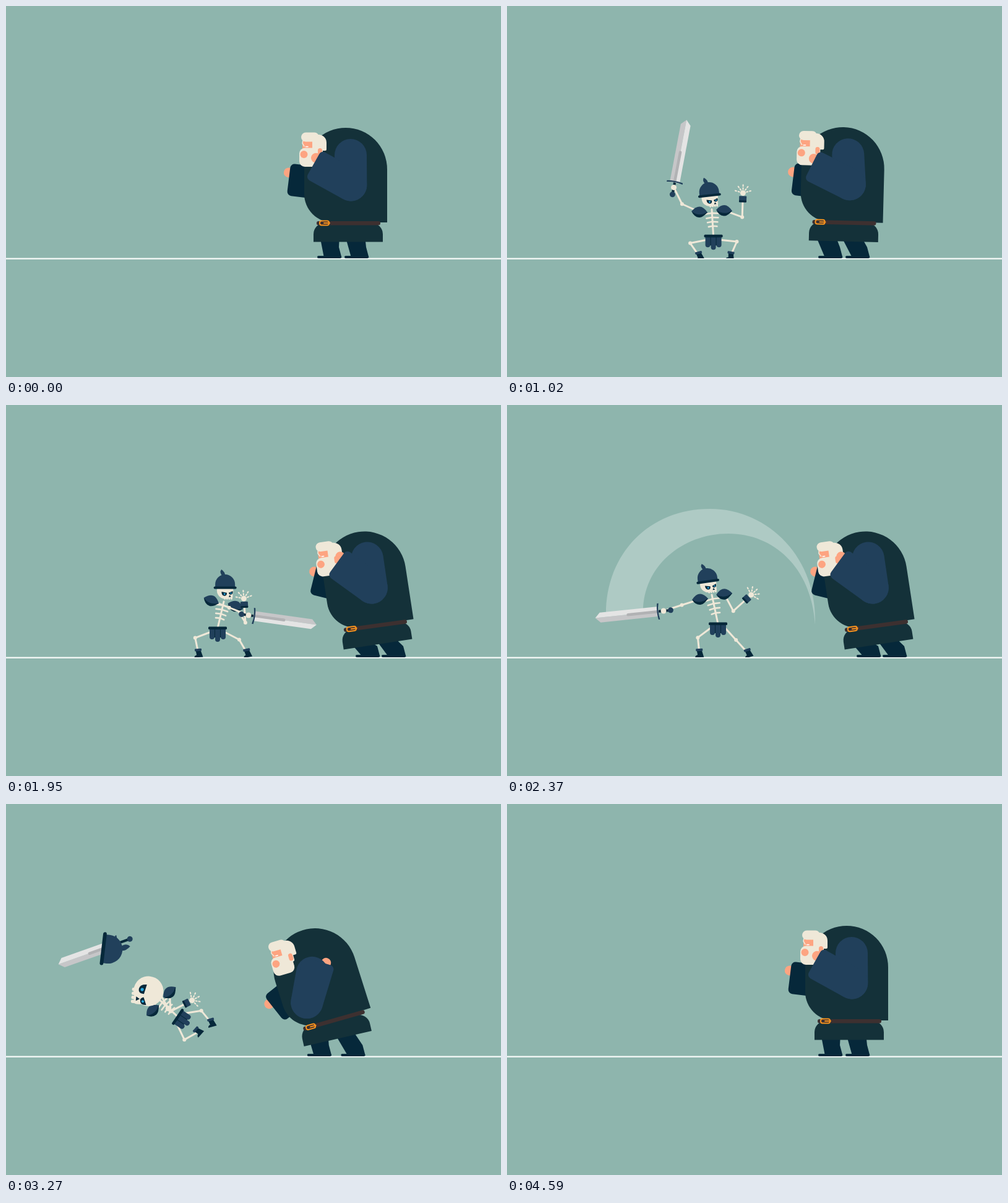
An HTML page with a canvas for the animation above (4.62 s loop, 800x600 px).

```html
<!DOCTYPE html>
<html lang="en">
<head>
<meta charset="utf-8">
<title>Skeleton attack</title>
<style>
html, body { margin: 0; width: 100%; height: 100%; overflow: hidden; background: #8eb5ad; }
canvas { display: block; }
</style>
</head>
<body>
<canvas id="stage" width="800" height="600"></canvas>
<script>
const c = document.getElementById('stage').getContext('2d');
const LOOP = 4620, GROUND = 408;
const BONE = '#efe8d8', NAVY = '#06283a', BLUE = '#21405b', COAT = '#143139', SKIN = '#fda481';

// ---------- helpers ----------
const RAD = Math.PI / 180;
const span = (t, a, b) => Math.min(1, Math.max(0, (t - a) / (b - a)));
const smooth = u => u * u * (3 - 2 * u);
const ease = (t, a, b) => smooth(span(t, a, b));
const pulse = (t, a, b, from, to) => ease(t, a, b) - ease(t, from, to);
const arc = u => 4 * u * (1 - u);
const mix = (a, b, u) => a.map((v, k) => v + (b[k] - v) * u);
const polar = ([x, y], deg, len) => [x + len * Math.cos(deg * RAD), y + len * Math.sin(deg * RAD)];
const angle = (a, b) => Math.atan2(b[1] - a[1], b[0] - a[0]) / RAD;
const distance = (a, b) => Math.hypot(b[0] - a[0], b[1] - a[1]);
const offset = ([ox, oy], x, y, deg) => {
  const co = Math.cos(deg * RAD), si = Math.sin(deg * RAD);
  return [ox + x * co - y * si, oy + x * si + y * co];
};
const noise = n => { const v = Math.sin(n * 127.1 + 3.7) * 43758.5453; return v - Math.floor(v); };

// Middle joint of a two-bone limb.
function bend(a, b, upper, lower, side) {
  const d = Math.min(distance(a, b), upper + lower);
  const cos = (upper * upper + d * d - lower * lower) / (2 * upper * d);
  return polar(a, angle(a, b) + side * Math.acos(Math.max(-1, Math.min(1, cos))) / RAD, upper);
}

function at([x, y], deg, scale, draw) {
  c.save();
  c.translate(x, y);
  c.rotate(deg * RAD);
  c.scale(scale, scale);
  draw();
  c.restore();
}
function box(x, y, w, h, r, color) {
  c.fillStyle = color;
  c.beginPath();
  c.roundRect(x, y, w, h, r);
  c.fill();
}
function dot([x, y], r, color) {
  c.fillStyle = color;
  c.beginPath();
  c.arc(x, y, r, 0, 7);
  c.fill();
}
function shape(path, color) {
  c.fillStyle = color;
  c.fill(new Path2D(path));
}
function line(points, width, color) {
  c.strokeStyle = color;
  c.lineWidth = width;
  c.lineCap = c.lineJoin = 'round';
  c.beginPath();
  points.forEach(p => c.lineTo(...p));
  c.stroke();
}
function aboveGround(depth, draw) {
  c.save();
  c.beginPath();
  c.rect(0, 0, 800, depth);
  c.clip();
  draw();
  c.restore();
}

// ---------- giant ----------
// body: x, y, skirt tilt, torso lean; near and far: wrist x, y, angle
const calm = { body: [553, 381, 0, 0], near: [497, 256, 209], far: [457, 280.5, 187], feet: [503, 547], head: [0, 0] };
const moods = {
  peek: { body: [-11, 0, 0, 0] },
  rear: { body: [-5, -2, 3, 3], near: [-10, 3, -5], far: [11, -2, 0] },
  struck: { body: [48, 5.5, -8.7, -8.7], near: [38, -1, 7], far: [40, 0, 7], feet: [62, 60] },
  windUp: { body: [59, 1, 8, 12], near: [231, -11, 126], far: [73, -115, 73], feet: [69, 67] },
  slam: { body: [-32, -2, -33, -44], near: [34, -6, 184], far: [-68, 117.5, -103.5], feet: [-37, -13], head: [20, -15] }
};
const moodLevels = t => ({
  peek: pulse(t, 0, 600, 700, 1470),
  rear: pulse(t, 600, 1470, 1680, 1780) + pulse(t, 3060, 3450, 3750, 4600),
  struck: pulse(t, 1680, 1780, 2380, 2620),
  windUp: pulse(t, 2380, 2620, 2690, 2800),
  slam: pulse(t, 2690, 2800, 3060, 3450)
});

function sleeve([x, y, deg], shoulder, color, reach) {
  const wrist = [x, y], elbow = polar(wrist, deg, -69);
  at(wrist, deg, 1, () => dot([1.5, 11], 8, SKIN));
  line([elbow, polar(elbow, angle(elbow, shoulder), Math.min(reach, distance(elbow, shoulder)))], 52, color);
  at(wrist, deg, 1, () => box(-95, -26, 95, 52, [26, 7, 7, 26], color));
}

// Drawn around the neck.
function giantHead(shouting) {
  box(-5, -32, 26, 26, [10, 13, 2, 2], BONE);
  box(-18, -24, 20, 17, 2, SKIN);
  box(-2, -26, 17, 30, 3, BONE);
  box(-20, -35.5, 29, 15, 7.5, BONE);
  line([[-17, -23], [-18, -18], [-15, -13]], 1.5, BONE);
  box(-23, -10.5, 35, 30.5, 9, BONE);
  box(7, -10, 7, 12, 3.5, SKIN);
  line([[-12.5, -12.5], [-9, -12.5]], 1.5, '#fff');
  if (shouting) {
    dot([-20, -11], 3.5, SKIN);
    dot([-9, 3], 11, SKIN);
    box(-16, -4, 14, 14, 4, NAVY);
    box(-14, -3, 7, 4, 2, '#e0393e');
  } else dot([-15.5, 0], 6, SKIN);
}

function drawGiant(t) {
  const levels = moodLevels(t), pose = {};
  for (const part in calm) {
    pose[part] = calm[part].map((v, k) =>
      Object.keys(moods).reduce((sum, m) => sum + levels[m] * (moods[m][part] ? moods[m][part][k] : 0), v));
  }
  const [x, y, tilt, lean] = pose.body, base = [x, y];
  const waist = offset(base, 0, -30, tilt), neck = offset(waist, -56, -111, lean);

  pose.feet.forEach((foot, k) => {
    const [hx, hy] = offset(base, k ? 11 : -30, -10, tilt);
    shape(`M${hx - 16} ${hy}H${hx + 16}L${foot + 35} 390L${foot + 39.5} 407H${foot + 11}Z`, NAVY);
    box(foot, 404, 39, 4, 2, NAVY);
  });
  sleeve(pose.far, offset(waist, -25, -80, lean), NAVY, 999);
  at(base, tilt, 1, () => box(-56, -30, 112, 30.5, [18, 18, 0, 0], COAT));
  at(waist, lean, 1, () => box(-71, -154, 134, 153, [67, 67, 0, 46], COAT));
  at(waist, lean * .9, 1, () => {
    box(-51, -3, 103, 6.5, 3, '#3d3030');
    c.strokeStyle = '#f7931e';
    c.lineWidth = 2;
    c.beginPath();
    c.roundRect(-46, -3.5, 15, 7, 3);
    c.stroke();
    line([[-39, 0], [-30, 0]], 2, '#f7931e');
  });
  at([neck[0] + pose.head[0], neck[1] + pose.head[1]], lean * .92, 1, () => giantHead(t > 2520 && t < 3150));
  sleeve(pose.near, offset(waist, 4, -110, lean), BLUE, 49);
}

// ---------- skeleton ----------
// angles: head, sword, pelvis; elbows, knees and shoulders follow from these points
const rise = { hip: [334, 381], neck: [327, 338], left: [277, 282], right: [389, 293],
  footL: [311, 407], footR: [361, 407], angles: [4, -7, 0] };
const guard = { hip: [333, 361], neck: [336, 317], left: [260, 308], right: [371, 335],
  footL: [311, 402], footR: [361, 402], angles: [-20, -172, 0] };
const strike = { ...guard, hip: [342, 361], neck: [352, 318], left: [392, 340], right: [385, 322],
  footR: [390, 402], angles: [0, 8, 0] };
const slash = { ...strike, hip: [341, 354], neck: [331, 307], left: [253, 333], right: [388, 313], angles: [-8, -186, 0] };
const smash = { ...slash, hip: [320, 342], neck: [297, 312], left: [263, 280], right: [306, 252], footR: [347, 357] };
const heap = { ...smash, hip: [260, 393], neck: [228, 367], left: [262, 400], right: [287, 399],
  footR: [326, 401], angles: [-8, -186, -80] };
// each pose with the times it is reached and left
const acts = [[rise, 0, 700], [guard, 1400, 1540], [strike, 1690, 2220], [slash, 2350, 2785], [smash, 2850, 2850], [heap, 3450, LOOP]];
// parts knocked off: where they are flung, where they land, height of the throw
const loose = {
  skull: { fly: [278, 261, 30], land: [210, 404, 123], hop: 70 },
  helmet: { fly: [233, 192, -36], land: [126, 407, -360], hop: 130 },
  sword: { fly: [186, 258, -76], land: [180, 342, -252], hop: 110 }
};

function limb(...joints) {
  line(joints, 3, BONE);
  joints.slice(1).forEach(j => dot(j, 3, BONE));
}
function pad() {
  shape('M-13 0Q0 -17 13 0Q0 14 -13 0Z', BLUE);
  shape('M-13 0Q0 9 13 -1Q6 9 0 9Q-8 9 -13 0Z', NAVY);
}
function boot() {
  shape('M-4 -5H4L7 6H-7Q-7 3 -3 2Z', NAVY);
  box(-5.5, -8, 11, 4, 1, BLUE);
}
function sword() {
  line([[0, 0], [-16, 0]], 4, NAVY);
  dot([-19.5, 0], 4.5, BLUE);
  shape('M0 -8H95L103 0H0Z', '#c6c6c8');
  shape('M0 8H95L103 0H0Z', '#e4e4e4');
  box(2, -2.5, 50, 4.5, [0, 2, 2, 0], '#b1b2b4');
  shape('M-1 -13Q2 0 -1 13H1.5Q4 0 1.5 -13Z', BLUE);
}
function skull(faceShown) {
  dot([0, 0], 14, BONE);
  box(-3, 4, 16, 9, 3, BONE);
  for (let k = 0; k < 4; k++) box(-2 + k * 3.8, 9, 3, 6.5, 1.2, BONE);
  if (!faceShown) return;
  shape('M-6 2L3 4Q3 10 -2 9Q-6 8 -6 2Z', NAVY);
  shape('M6 4L13 1Q14 7 9 7Q7 7 6 4Z', NAVY);
  dot([-1, 6], 1.5, '#29a9e0');
  dot([10, 4.5], 1.2, '#29a9e0');
  shape('M6 11L8 7.5L10 11Z', NAVY);
}
function helmet() {
  shape('M-4 -18Q-10 -24 -6 -29Q0 -25 0 -19Z', BLUE);
  shape('M-16 0V-5A16 16 0 0 1 16 -5V0Z', BLUE);
  box(-18.5, -1.5, 37, 4, 2, NAVY);
}
function hand() {
  box(-6, -6, 10, 12, 1, BLUE);
  box(-6, -6, 3, 12, 1, NAVY);
  dot([9, 0], 4.5, BONE);
  for (let a = -75; a <= 75; a += 37) {
    for (const r of [6, 11]) line([polar([9, 0], a, r), polar([9, 0], a, r + 2)], 2.1, BONE);
  }
}
function pelvis() {
  box(-12, 0, 24, 15, 2, NAVY);
  for (const k of [-1, 0, 1]) box(k * 9 - 4, 0, 8, k ? 18 : 22, [0, 0, 4, 4], BLUE);
  box(-15, -2.5, 30, 4.5, 1.5, NAVY);
}
function ribs(length) {
  line([[0, 0], [0, length]], 3, BONE);
  for (let k = 0; k < 4; k++) {
    const y = length * (.14 + k * .16), w = 11 - k * 1.4;
    line([[-w, y + 1], [0, y], [w, y + 1]], 2.6, BONE);
  }
}

function skeletonPose(t) {
  const i = acts.findLastIndex(act => t >= act[1]);
  const [from, , leave] = acts[i], [to, reach] = acts[i + 1] || acts[i];
  const u = i < 3 ? ease(t, leave, reach) : i < 5 ? span(t, leave, reach) : 0;
  const pose = {};
  for (const part in from) {
    pose[part] = mix(from[part], to[part], u);
    if (i === 4 && part !== 'angles') pose[part][1] -= 40 * arc(u);
  }
  if (from === strike) pose.left[1] -= 65 * arc(u);
  return pose;
}

function drawSkeleton(t) {
  if (t < 330 || t > 4580) return;
  const { hip, neck, left, right, footL, footR, angles: [tilt, blade, turn] } = skeletonPose(t);
  const thrown = span(t, 2785, 2850), fallen = span(t, 2850, 3450);
  const up = span(t, 330, 600) - 1;
  const lift = -230 * (2.7 * up ** 3 + 1.7 * up ** 2);
  const sink = 105 * Math.sin(span(t, 3790, 4580) * Math.PI / 2) ** 1.5;
  const spine = angle(neck, hip) - 90;

  const part = (name, attached, size, draw) => {
    const { fly, land, hop } = loose[name];
    const [x, y, deg] = mix(mix(attached, fly, thrown), land, fallen);
    at([x, y - hop * arc(fallen)], deg, size, draw);
  };
  const leg = (foot, side) => {
    const top = offset(hip, side * 11, 6, turn), knee = bend(top, foot, 27, 26, -side);
    limb(top, knee, foot);
    at(foot, (angle(knee, foot) - 90) * .4, 1, boot);
  };
  const arm = (wrist, side) => {
    const shoulder = offset(neck, side * 20, 3, spine), elbow = bend(shoulder, wrist, 31, 30, side);
    limb(shoulder, elbow, wrist);
    at(shoulder, spine + 8, 1, pad);
    return angle(elbow, wrist);
  };

  c.save();
  c.translate(0, lift + sink);
  leg(footL, -1);
  leg(footR, 1);
  at(neck, spine, 1, () => ribs(distance(neck, hip)));
  at(hip, turn, 1, pelvis);
  at(right, arm(right, 1), 1, hand);
  arm(left, -1);
  part('sword', [...polar(left, blade, 8), blade + 80 * up], 1, sword);
  dot(left, 4.5, BONE);
  const size = 1 + .45 * thrown, head = offset(neck, -2, -18, spine);
  part('skull', [...head, tilt], .95 * size + .5 * fallen, () => skull(t < 2800 || t > 3050));
  part('helmet', [...offset(head, 0, -5, tilt), tilt], size, helmet);
  c.restore();
}

// ---------- effects ----------
function drawDirt(t) {
  const age = t - 360;
  if (age < 0 || age > 600) return;
  for (let n = 0; n < 80; n++) {
    const side = noise(n) + noise(n + 50) - 1, life = 260 + noise(n + 100) * 330;
    if (age > life) continue;
    const height = 8 + 95 * noise(n + 200) ** 1.5 * (1 - Math.abs(side) * .6);
    dot([332 + side * 190 * (1 - Math.exp(-age / 110)), GROUND - height * Math.sin(Math.PI * age / life)],
      .6 + 4 * noise(n + 300) ** 1.6, '#fff');
  }
}

function drawSlash(t) {
  if (t < 2220 || t > 2500) return;
  const sweep = u => (8 - 190 * u) * RAD;
  c.save();
  c.beginPath();
  c.moveTo(330, 340);
  c.arc(330, 340, 300, sweep(span(t, 2375, 2500)), sweep(ease(t, 2220, 2350)), true);
  c.clip();
  shape('M160 338C160 240 230 168 328 168C425 168 502 250 498 355C492 262 430 208 358 208C282 208 220 262 220 334Z',
    'rgba(255,255,255,.28)');
  c.restore();
}

function draw(t) {
  c.fillStyle = '#8eb5ad';
  c.fillRect(0, 0, 800, 600);
  const jolt = [400, 2800].reduce((sum, s) => sum + (t >= s ? 1 - span(t, s, s + 130) : 0), 0);
  c.save();
  c.translate(0, jolt);
  box(0, 407.5, 800, 2.2, 0, '#f8fbfa');
  drawSlash(t);
  drawGiant(t);
  aboveGround(t > 2730 ? 410 : GROUND, () => drawSkeleton(t));
  aboveGround(GROUND, () => drawDirt(t));
  c.restore();
}

const start = performance.now();
function tick() {
  draw((performance.now() - start) % LOOP);
  requestAnimationFrame(tick);
}
tick();
</script>
</body>
</html>
```
